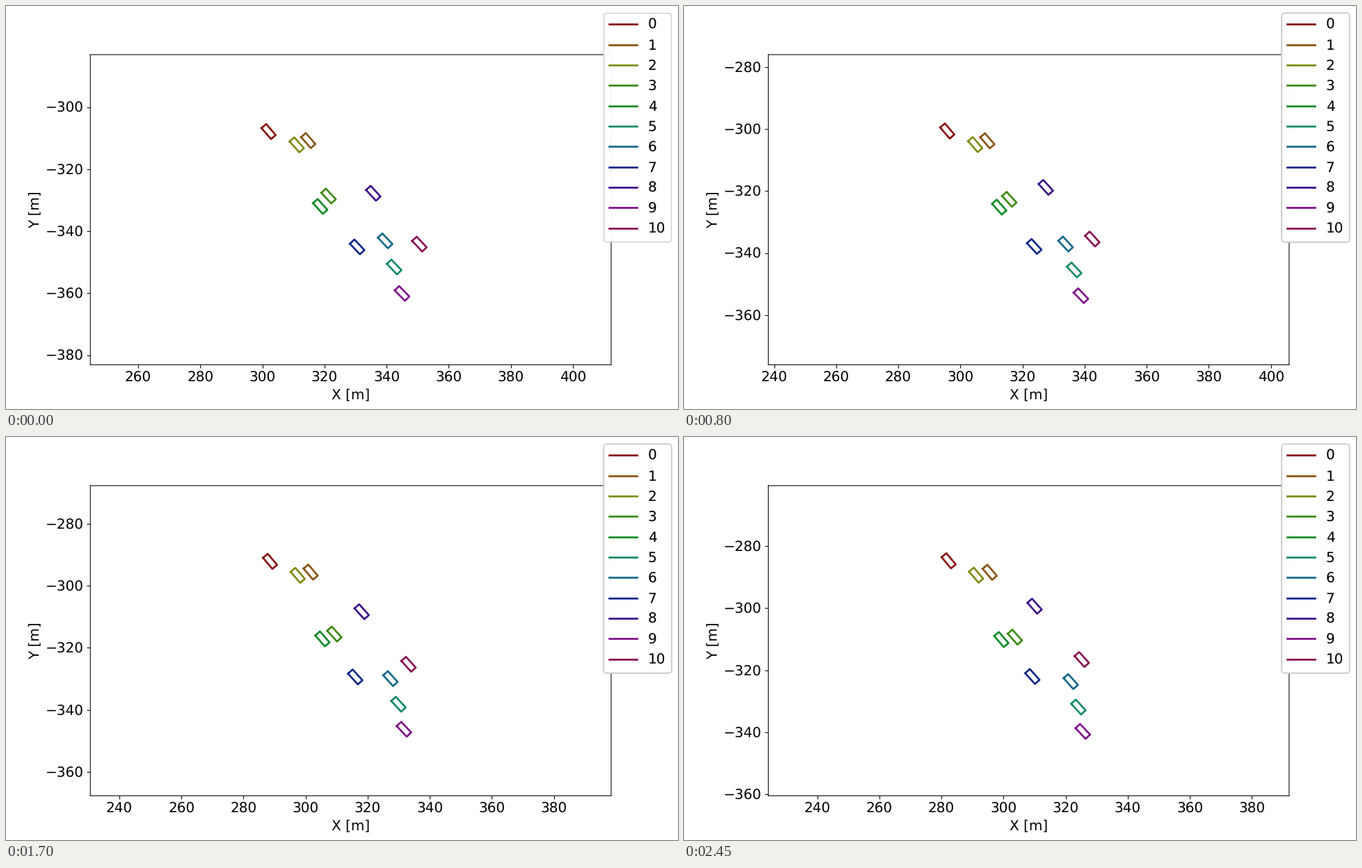
Animation of 966 by 580 pixels, one loop 2500 ms. Source, as a matplotlib script:

```python
import colorsys

import numpy as np
import matplotlib.pyplot as plt
from matplotlib.animation import FuncAnimation
from matplotlib.ticker import MultipleLocator

WIDTH, HEIGHT, DPI = 966, 580, 96
FRAMES, INTERVAL = 50, 50
FONT = 15
LENGTH, BREADTH = 4.7, 2.0   # vehicle size in metres
VIEW_H = 100.0               # visible height in metres
LAYERS = 12                  # legends pile up until they are opaque

# Per vehicle: start on the stage and drift against the convoy, in pixels
CARS = np.array([
    (377.5, 180.7, 3, -2.5),
    (434.5, 193.7, 5, 1),
    (418.0, 199.8, 2, -1),
    (463.7, 273.5, 12, 14.5),
    (451.7, 288.5, 4.5, 3),
    (558.0, 375.6, 9, 13),
    (545.0, 338.0, 11, 14),
    (504.8, 346.7, -4, -2),
    (528.0, 269.5, -24, -26),
    (569.3, 413.7, 4, 10),
    (594.3, 342.7, -22.5, -22.5),
])

plt.rcParams["text.hinting"] = "none"
fig, ax = plt.subplots(figsize=(WIDTH / DPI, HEIGHT / DPI), dpi=DPI)
fig.subplots_adjust(left=0.1255, right=0.9005, bottom=0.1098, top=0.8793)
for spine in ax.spines.values():
    spine.set_snap(False)

box = ax.get_position()
scale = box.height * HEIGHT / VIEW_H
view = np.array([box.width * WIDTH / scale, VIEW_H])
middle = np.array([(box.x0 + box.x1) / 2 * WIDTH,
                   (1 - (box.y0 + box.y1) / 2) * HEIGHT])
starts = (CARS[:, :2] - middle) / scale * (1, -1)
drifts = CARS[:, 2:] / scale * (1, -1)

ax.set_xlabel("X [m]", fontsize=FONT)
ax.set_ylabel("Y [m]", fontsize=FONT)
ax.tick_params(labelsize=FONT)
for axis in (ax.xaxis, ax.yaxis):
    axis.set_major_locator(MultipleLocator(20))


def convoy(k):
    """Centre of the convoy in metres, gently speeding up."""
    return np.array([328.46 - 0.397 * k - 0.00037 * k**2,
                     -333.08 + 0.432 * k + 0.0006 * k**2])


def positions(k):
    return convoy(k) + starts + drifts * k / (FRAMES - 1)


def outline(centre, velocity):
    """Closed rectangle that points along the velocity."""
    along = velocity / np.hypot(*velocity)
    across = np.array([-along[1], along[0]])
    signs = [(1, 1), (1, -1), (-1, -1), (-1, 1), (1, 1)]
    return np.array([centre + s * along * LENGTH / 2 + t * across * BREADTH / 2
                     for s, t in signs]).T


lines = []
for i in range(len(CARS)):
    color = colorsys.hls_to_rgb(i / len(CARS), 0.3, 0.8)
    lines += ax.plot([], [], color=color, lw=2, label=str(i))

legends = [fig.legend(fontsize=FONT) for _ in range(LAYERS)]
# Only the two topmost layers show through, the others add to the frame
for legend in legends[:-2]:
    for part in legend.get_lines() + legend.get_texts():
        part.set_visible(False)


def update(k):
    low, high = convoy(k) - view / 2, convoy(k) + view / 2
    ax.set_xlim(low[0], high[0])
    ax.set_ylim(low[1], high[1])
    here = positions(k)
    velocity = positions(k + 0.5) - positions(k - 0.5)
    for line, centre, v in zip(lines, here, velocity):
        line.set_data(*outline(centre, v))
    for i, legend in enumerate(legends):
        legend.set_visible(i >= LAYERS - 2 - k)
    return lines


anim = FuncAnimation(fig, update, frames=FRAMES, interval=INTERVAL,
                     init_func=lambda: update(0), repeat=True,
                     repeat_delay=0, blit=False)
plt.show()
```
